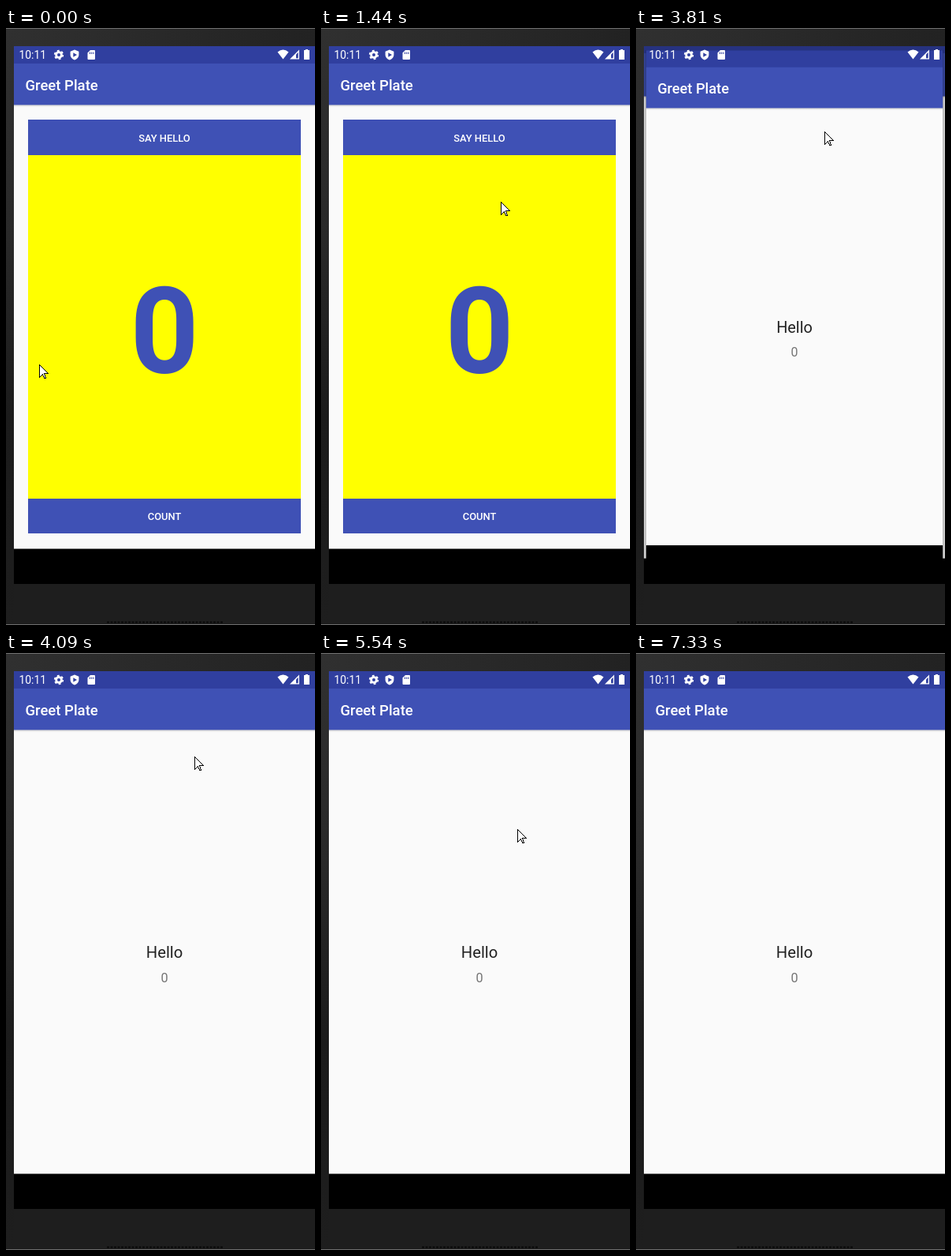
These frames come from a looping animation (392x756 px, 8000 ms). An HTML page:

```html
<!DOCTYPE html>
<html lang="en">
<head>
<meta charset="utf-8">
<title>Counter app</title>
<style>
  html, body { margin: 0; width: 100%; height: 100%; overflow: hidden; background: #1e1e1e; }
  svg { display: block; width: 392px; height: 756px; }
  text { font-family: Roboto, sans-serif; }
  .mid { text-anchor: middle; }
  .bar { font-size: 18.5px; font-weight: 500; fill: #fff; }
  .btn { font-size: 12.9px; font-weight: 500; fill: #fff; }
</style>
</head>
<body>
<svg viewBox="0 0 392 756">
  <defs>
    <linearGradient id="side" x2="0" y2="1">
      <stop offset="0" stop-color="#303030"/>
      <stop offset=".35" stop-color="#292929"/>
      <stop offset=".65" stop-color="#1b1b1b"/>
      <stop offset="1" stop-color="#1e1e1e"/>
    </linearGradient>
    <linearGradient id="top">
      <stop offset="0" stop-color="#303030"/>
      <stop offset="1" stop-color="#222"/>
    </linearGradient>
    <linearGradient id="shade" x2="0" y2="1">
      <stop offset="0" stop-opacity=".2"/>
      <stop offset="1" stop-opacity="0"/>
    </linearGradient>
    <clipPath id="screen"><rect x="10" y="23" width="382" height="681"/></clipPath>
    <g id="window">
      <rect x="10" y="23" width="382" height="681"/>
      <rect x="10" y="97" width="382" height="562.5" fill="#fafafa"/>
      <rect x="10" y="97" width="382" height="3" fill="url(#shade)"/>
      <rect x="10" y="23" width="382" height="22.5" fill="#303f9f"/>
      <rect x="10" y="45" width="382" height="52.4" fill="#3f51b5"/>
      <text class="bar" x="24.5" y="78.5">Greet Plate</text>
    </g>
  </defs>

  <!-- phone body -->
  <rect width="392" height="756" fill="#1e1e1e"/>
  <rect width="392" height="23" fill="url(#top)"/>
  <rect width="10" height="756" fill="url(#side)"/>
  <path d="M0 .5H392M0 755.5H392" stroke="#707070"/>
  <path d="M128 752.5H275" stroke="#080808" stroke-width="2" stroke-dasharray="3 1.5"/>

  <g clip-path="url(#screen)">
    <rect x="10" y="23" width="382" height="681"/>
    <g id="counter">
      <use href="#window"/>
      <rect x="28" y="116" width="346" height="524" fill="#3f51b5"/>
      <rect x="28" y="161" width="346" height="435" fill="#ff0"/>
      <text class="btn mid" x="201" y="143.5">SAY HELLO</text>
      <text class="btn mid" x="201" y="623">COUNT</text>
      <text class="mid" x="201" y="437" font-size="152" font-weight="700" fill="#3f51b5">0</text>
    </g>
    <rect id="dim" x="10" y="23" width="382" height="681" opacity=".2"/>
    <g id="greeting">
      <use href="#window"/>
      <text class="mid" x="201" y="386" font-size="20.2" fill="#212121">Hello</text>
      <text class="mid" x="201" y="417" font-size="16.2" fill="#757575">0</text>
    </g>
  </g>

  <!-- status bar -->
  <g fill="#fff">
    <text x="16.5" y="39" font-size="13.9">10:11</text>
    <circle cx="67" cy="34" r="3.4" fill="none" stroke="#fff" stroke-width="2.8"/>
    <circle cx="67" cy="34" r="5.2" fill="none" stroke="#fff" stroke-width="2" stroke-dasharray="2.72"/>
    <path d="M87 27.5L92.4 29.7V33.6C92.4 37 90 39.7 87 40.5C84 39.7 81.6 37 81.6 33.6V29.7Z"/>
    <path d="M85.3 31.2L90 34L85.3 36.8Z" fill="#303f9f"/>
    <path d="M107 28H112Q113 28 113 29V39Q113 40 112 40H104.5Q103.5 40 103.5 39V31.5Z"/>
    <path d="M106.5 30.5V33M108.7 30.5V33M110.9 30.5V33" stroke="#303f9f"/>
    <path d="M344.5 30.5Q351.5 24.5 358.5 30.5L351.5 39.5Z"/>
    <path d="M360 39.5L372 27.5V39.5Z"/>
    <path d="M368 33.5L370.7 30.8V38.2H368Z" fill="#303f9f"/>
    <path d="M380 28V27H383V28H385V40H378V28Z"/>
  </g>

  <path id="cursor" d="M.5 .5V16.5L4.5 12.5L6.5 17.5H8.5L6.5 11.5H11.5Z"
    fill="#fff" stroke="#000" stroke-linejoin="round" shape-rendering="crispEdges"/>
</svg>
<script>
  const LOOP = 8000, STEP = 130, OPEN = 3810;
  const $ = id => document.getElementById(id);
  const cursor = $('cursor'), counter = $('counter'), dim = $('dim'), greeting = $('greeting');

  // where the hand stops: [arrival time, x, y]
  const stops = [
    [0, 42, 426], [630, 120, 560], [890, 368, 742], [1290, 209, 232], [1440, 228, 220],
    [1740, 243, 163], [2370, 239, 131], [5140, 320, 56], [5540, 249, 223], [6260, 213, 451],
    [6530, 374, 332], [6650, 279, 440], [6930, 272, 532], [7060, 260, 428], [7330, 400, 283]
  ];

  const mix = (a, b, u) => a + (b - a) * u;
  const easeOut = u => 1 - (1 - u) ** 3;

  function pointerAt(t) {
    const i = stops.findLastIndex(s => s[0] <= t);
    const [t0, x0, y0] = stops[i];
    const [t1, x1, y1] = stops[i + 1] || [LOOP, x0, y0];
    const steps = Math.min(2, Math.round((t1 - t0) / STEP));
    const u = Math.max(0, 1 - Math.ceil((t1 - t) / STEP) / steps);
    return [mix(x0, x1, u), mix(y0, y1, u)].map(Math.round);
  }

  const scale = (el, k) =>
    el.setAttribute('transform', `translate(201 363.5) scale(${k}) translate(-201 -363.5)`);
  const show = (el, on) => el.setAttribute('visibility', on ? 'visible' : 'hidden');

  function draw(t) {
    const open = t >= OPEN;
    const u = easeOut(Math.min(1, Math.floor((t - OPEN) / STEP) / 2));
    cursor.setAttribute('transform', `translate(${pointerAt(t)})`);
    scale(greeting, open ? mix(.985, 1, u) : 1);
    scale(counter, open ? mix(1.041, 1.05, u) : 1);
    show(greeting, open);
    show(dim, open);
  }

  const start = performance.now();
  function tick() {
    draw((performance.now() - start) % LOOP);
    requestAnimationFrame(tick);
  }
  tick();
</script>
</body>
</html>
```
